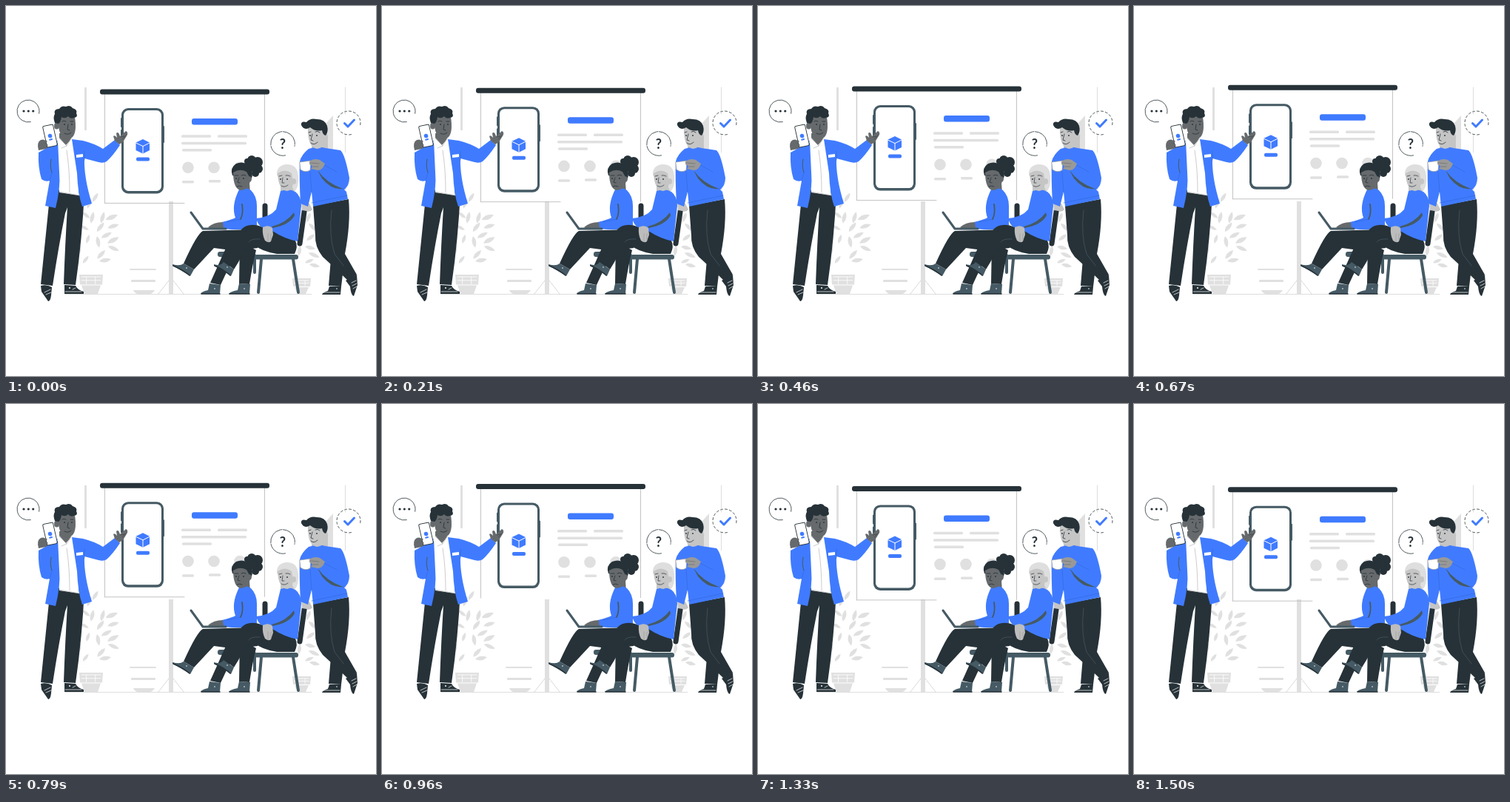
Write an HTML page with a canvas that moves like this. It is 500 px wide and 500 px high and loops after 1540 ms.

```html
<!DOCTYPE html>
<html lang="en">
<head>
<meta charset="utf-8">
<title>Presentation</title>
<style>
html, body { margin: 0; width: 100%; height: 100%; overflow: hidden; background: #fff; }
canvas { display: block; width: 500px; height: 500px; }
</style>
</head>
<body>
<canvas id="stage" width="500" height="500"></canvas>
<script>
const ctx = document.getElementById('stage').getContext('2d');
const LOOP = 1540, PEAK = 725, LIFT = 6.2;
const BLUE = '#407bff', DARK = '#263238', SLATE = '#455a64', PALE = '#e0e0e0',
  SKIN = '#666a6c', LIGHT = '#c5c5c5', WHITE = '#fff';

function fill(color, path) {
  ctx.fillStyle = color;
  ctx.fill(new Path2D(path));
}
function line(color, width, path) {
  ctx.strokeStyle = color;
  ctx.lineWidth = width;
  ctx.lineCap = ctx.lineJoin = 'round';
  ctx.stroke(new Path2D(path));
}
function oval(color, x, y, rx, ry = rx, turn = 0) {
  ctx.fillStyle = color;
  ctx.beginPath();
  ctx.ellipse(x, y, rx, ry, turn, 0, 7);
  ctx.fill();
}
function bar(color, x, y, w, h, r = 1) {
  ctx.fillStyle = color;
  ctx.beginPath();
  ctx.roundRect(x, y, w, h, r);
  ctx.fill();
}
function leaf(x, y, size, degrees) {
  ctx.save();
  ctx.translate(x, y);
  ctx.rotate(degrees * Math.PI / 180);
  ctx.scale(size, size);
  fill(PALE, 'M-8 0Q-2-6 8-1Q1 5-8 0Z');
  ctx.restore();
}
function pot(x, y, w, h) {
  const rim = h * .52;
  fill(PALE, `M${x} ${y}h${w}l-1 ${rim}h${2 - w}ZM${x + 3} ${y + rim + 1}h${w - 6}l-4 ${h - rim - 1}h${14 - w}Z`);
  line(WHITE, .8, `M${x + 3} ${y + 3}h${w - 6}M${x + 3} ${y + rim / 2 + 1}h${w - 6}M${x + w * .3} ${y + 3}v${rim - 4}M${x + w * .68} ${y + 3}v${rim - 4}`);
}
function bubble(x, y, r, dash) {
  ctx.save();
  ctx.setLineDash(dash);
  ctx.strokeStyle = DARK;
  ctx.lineWidth = .8;
  ctx.beginPath();
  ctx.arc(x, y, r, 1.35, 6.5);
  ctx.stroke();
  ctx.restore();
}

function drawRoom() {
  bar(PALE, 106, 110, 3, 58, 0);
  line('#d5d5d5', .8, 'M458.5 110V146M458.5 174V198M80 389.5H413');
  fill(PALE, 'M442 148V195L431 191V160Z');
  bar(PALE, 220, 264, 6, 125, 0);
  line('#d0d0d0', .8, 'M220 371L206 389M226 371L240 389');
  bar(PALE, 167, 355, 36, 2);
  bar(PALE, 169, 370, 33, 3);
  fill(PALE, 'M172 384H201Q198 389 194 389H179Q174 389 172 384Z');
  pot(99, 363, 32, 26);
  pot(387, 368, 25, 21);
  [[113, 267, .9, -65], [121, 259, .9, -55], [108, 283, .8, 40], [117, 286, 1, -75],
   [106, 300, .8, 30], [111, 315, .8, -70], [99, 331, .9, -70], [108, 343, .8, -50],
   [131, 286, 1, -72], [143, 286, 1.1, -20], [128, 299, 1, -50], [145, 298, 1, -15],
   [136, 310, 1, -25], [124, 319, 1, 82], [145, 317, 1.1, -25], [129, 336, 1, -45],
   [145, 328, 1, 25], [134, 344, 1, -8]].forEach(p => leaf(...p));
  [[409, 286, .9, -65], [414, 299, .9, 45], [412, 313, .9, -35], [397, 331, .9, -80],
   [411, 327, .9, 15], [416, 337, 1, 25], [410, 345, .8, -20], [417, 351, .9, 15]].forEach(p => leaf(...p));
}

function drawBoard(time) {
  line('#bdbdbd', .9, 'M133.5 119V266.5M349.5 119V266');
  if (time < 800 || time > 1300) line('#bdbdbd', .9, 'M133.5 266.5H241');
  bar(DARK, 127, 112.5, 229, 7, 3);

  line(SLATE, 2, 'M156 152V163M156 168V179M213 163V184');
  bar(SLATE, 156, 138, 57, 115.5, 9);
  bar(WHITE, 159, 141, 51, 109, 6.5);
  fill(BLUE, 'M185 180L194 184.5V195L185 199.5L175.5 195V184.5Z');
  line(WHITE, 1, 'M175.5 185L185 189.5L194 185M185 189.5V199');
  bar(BLUE, 176, 204.5, 18, 5, 2);

  bar(BLUE, 251, 152, 62, 8.5, 3);
  [[237, 174.3, 40], [286, 174.3, 40], [237, 183.8, 88], [238, 193, 40],
   [238, 236, 16], [274, 235, 16]].forEach(([x, y, w]) => bar(PALE, x, y, w, 3.5, 1.5));
  [246, 281, 316].forEach(x => oval(PALE, x, 218.2, 7.8));
}

function drawBubbles() {
  bubble(30, 142, 15, []);
  [24, 30.3, 36.7].forEach(x => oval(DARK, x, 142, 1.6));
  bubble(374, 186, 16.3, [26, 1.5]);
  ctx.fillStyle = DARK;
  ctx.font = 'bold 18px Lato, sans-serif';
  ctx.textAlign = 'center';
  ctx.fillText('?', 374, 193);
  bubble(463, 158, 16, [3, 3]);
  line(BLUE, 3, 'M457.5 158.5L462 163L470.5 154');
}

function drawPresenter() {
  fill(DARK, 'M58 268L47 376L63 378Q71 325 80 280L83 272Q80 320 78 376L94 377Q103 315 106 250L72 248Z');
  fill(DARK, 'M47 378Q55 376 62 380L61 391Q60 399 57 399L48 386Z');
  fill(DARK, 'M79 377L94 378Q97 384 105 386V389H79Z');
  line(WHITE, .7, 'M52 387L60 383M54 390L61 387M80 386H102M90 383L94 381');
  oval(WHITE, 86, 381, 1);

  fill(WHITE, 'M70 184L90 181L99 256L72 252Z');
  line('#aaa', .6, 'M82 195Q86 220 86 252M72 251L99 256');
  fill(SKIN, 'M72 172H89L88 180L81 188L72 181Z');
  fill(BLUE, 'M70 182Q58 186 53 193L44 198Q43 218 48 234Q53 238 59 236L53 270L67 273Q74 245 72 225Z');
  fill(BLUE, 'M89 180L104 182Q120 186 131 193L147 181L154 188Q144 203 136 210Q132 213 125 211L106 206Q105 231 116 267L103 271Q97 254 96 226Z');
  line(SLATE, 1, 'M61 207Q59 217 62 225');
  line('#3165d8', .6, 'M106 196V208M59 236L62 226');
  fill(WHITE, 'M95 201L104 200V204L95 205Z');
  fill(WHITE, 'M72 178L82 189L75 192L69 184ZM89 177L82 189L88 190Z');
  line('#999', .5, 'M72 179L82 189L75 192M89 178L82 189');

  oval(SKIN, 68.5, 162, 3.5, 4.5);
  fill(SKIN, 'M71 149Q82 144 93 150Q96 170 90 177Q82 183 74 174Q70 166 71 149Z');
  fill(DARK, 'M66 158Q63 150 66 146Q64 139 72 139Q75 134 81 136Q87 133 90 138Q97 140 95 145Q98 150 92 151Q87 153 84 149Q80 153 75 150Q74 157 71 159Z');
  line(DARK, .8, 'M76 156Q78 154 81 156M87 156L91 156M84 160L83 167L86 168M79 172Q84 175 88 171');
  oval(DARK, 79, 160, .9);
  oval(DARK, 89, 160, .9);

  fill(SKIN, 'M44 195Q41 184 47 181Q52 179 55 184L59 189L54 193Z');
  ctx.save();
  ctx.translate(59.5, 175.5);
  ctx.rotate(-.22);
  bar(DARK, -7.5, -15, 15, 30, 2);
  bar(WHITE, -6.6, -14.1, 13.2, 28.2, 1.5);
  oval(BLUE, 0, 0, 2.8);
  bar(BLUE, -2.5, 4, 5, 2);
  ctx.restore();
  line(SKIN, 3, 'M46 185L54 183M46 189L55 188');
  fill(SKIN, 'M147 182L145 176Q147 174 150 178L149 172Q152 169 154 176L162 169Q165 170 164 174L158 184L153 187Z');
  line(DARK, .5, 'M155 177L160 176M157 180L162 175');
}

function drawWoman() {
  line(DARK, 7, 'M350 270V304');
  line(SLATE, 4, 'M294 338L288 365M336 337V360');
  bar(SLATE, 286, 332, 48, 7, 3);
  fill(DARK, 'M302 316L276 374L290 377Q302 350 315 330L340 327V303Z');
  fill(DARK, 'M266 304Q258 308 240 348L254 356L281 327L334 334V302Z');
  fill(SLATE, 'M240 348L254 356L249 365Q235 356 225 351V349Q235 352 240 348Z');
  fill(SLATE, 'M275 375L290 377L289 389H263Q264 386 273 384Z');
  line(DARK, 1.5, 'M226 351Q238 356 248 364M264 389H289');
  oval(WHITE, 244, 354, .8);
  oval(WHITE, 282, 382, .8);

  fill(SKIN, 'M315 238L329 239L330 253H315Z');
  fill(BLUE, 'M315 248Q325 244 331 249Q339 257 339 270V302H305L292 301V292Q307 288 310 286Q304 270 315 248Z');
  line(SLATE, 1.8, 'M319 268Q321 280 317 288');
  line('#3165d8', .6, 'M317 288L299 292');
  fill(SKIN, 'M293 292Q281 292 273 299L276 301H294Z');
  line(SLATE, 3, 'M250 279L266 301H297');

  [[340, 211, 7], [332, 208, 6], [341, 220, 6], [331, 216, 8], [337, 226, 5], [326, 210, 4]]
    .forEach(([x, y, r]) => oval(DARK, x, y, r));
  fill(DARK, 'M306 229Q302 219 311 213Q323 208 331 219Q336 230 328 240L316 232Z');
  fill(SKIN, 'M307 225Q316 219 325 224L330 233Q330 247 318 249Q307 248 307 225Z');
  oval(SKIN, 329, 234, 2.8, 3.8);
  line(DARK, .8, 'M309 229L314 229M318 229Q321 227 324 229M315 232L313 238L316 239M312 244Q316 242 319 244');
  oval(DARK, 311, 233, .9);
  oval(DARK, 321, 233, .9);
}

function drawElder() {
  line(DARK, 7, 'M404 271L397 321');
  line(SLATE, 4, 'M345 342L341 387M388 342L395 387');
  bar(SLATE, 336, 336, 59, 6.5, 3);
  fill(DARK, 'M316 318L315 375L329 376Q333 350 338 330Z');
  fill(DARK, 'M348 299Q328 291 318 302L294 345L308 356Q320 337 328 319Q346 332 366 335H390Q395 325 391 317L360 300Z');
  line('#536169', .6, 'M328 319Q331 314 343 315');
  fill(SLATE, 'M294 346L308 356L304 365Q293 356 281 351V349Q290 352 294 346Z');
  fill(SLATE, 'M315 375L330 376L329 389H301Q303 386 313 384Z');
  line(DARK, 1.5, 'M282 351Q294 356 303 364M302 389H329');
  oval(WHITE, 299, 353, .8);
  oval(WHITE, 322, 382, .8);

  fill(LIGHT, 'M371 240H390V258H371Z');
  fill(BLUE, 'M371 250Q383 246 391 251Q399 257 399 270L394 318Q377 315 360 304L346 299Q341 297 338 287Q357 285 365 275Z');
  fill(SLATE, 'M359 298Q379 293 389 279L390 283Q383 296 360 300Z');
  fill('#bdbdbd', 'M347 299Q355 295 360 300L361 309L358 318Q355 321 350 317Q346 309 347 299Z');
  line('#888', .5, 'M354 308V318M358 308V316');

  fill('#dedede', 'M366 229Q365 216 378 214Q394 213 395 230Q396 245 390 251L384 239Z');
  fill(LIGHT, 'M367 226Q377 219 386 226L388 238Q388 248 380 250Q368 249 367 226Z');
  oval(LIGHT, 389, 237, 3, 4);
  line(DARK, .7, 'M369 230L373 229M378 229Q381 228 384 230M374 232L373 239L376 239M372 243Q376 246 381 242');
  oval(DARK, 371, 234, .9);
  oval(DARK, 380, 234, .9);
}

function drawStanding() {
  fill(DARK, 'M440 330L436 378L453 379L458 338Z');
  fill(DARK, 'M415 270L463 261Q466 293 458 335L474 363L462 371Q445 354 428 339Q417 325 418 310Z');
  line('#536169', .6, 'M440 276Q436 310 444 335L456 351');
  fill(DARK, 'M437 379H453L452 390H427Q428 387 435 385Z');
  fill(DARK, 'M459 371L474 363L475 377L470 392Q466 391 465 379Z');
  line(WHITE, .7, 'M429 387H451M467 374L473 371M468 378L474 375M469 382L474 379');
  oval(WHITE, 447, 382, .8);

  fill(LIGHT, 'M399 266L410 267L414 275Q411 279 406 277L400 276Z');
  fill(LIGHT, 'M413 178H435V198H413Z');
  fill(BLUE, 'M409 193Q421 189 432 192L452 195Q458 200 464 232Q464 243 457 248L460 251L462 261L415 271L413 251L408 271L398 267Q396 232 397 210Q399 201 409 193Z');
  fill(SLATE, 'M421 222Q433 239 455 247Q440 249 427 233Z');
  line('#3165d8', .6, 'M413 251L411 224M455 247L459 247M447 224L430 215M413 266L461 256');

  fill(WHITE, 'M397 211L412 209L411 222Q404 226 398 221Z');
  line('#999', .7, 'M397 211L412 209L411 222Q404 226 398 221Z');
  fill('#999', 'M410 210Q416 205 424 208L431 213Q428 222 421 222L412 220Q417 216 410 214Z');
  line('#666', .6, 'M412 212L423 213M415 217L422 217');

  fill(LIGHT, 'M408 163Q424 157 433 168L434 181Q432 191 420 193Q407 191 408 163Z');
  oval(LIGHT, 432, 177, 3.2, 4.5);
  fill(DARK, 'M399 161Q398 155 406 157Q411 151 420 153Q431 153 434 162Q436 170 432 175Q428 174 427 168Q418 170 411 164Q403 169 399 161Z');
  line(DARK, .8, 'M409 171L412 170M418 170Q421 168 424 171M414 173L412 181L415 182M412 185Q416 189 421 184');
  oval(DARK, 411, 175, .9);
  oval(DARK, 420, 175, .9);
}

function render(now) {
  const time = now % LOOP;
  const rise = time < PEAK ? time / PEAK : (LOOP - time) / (LOOP - PEAK);
  ctx.fillStyle = WHITE;
  ctx.fillRect(0, 0, 500, 500);
  drawRoom();
  ctx.save();
  ctx.translate(0, -LIFT * rise);
  drawBoard(time);
  ctx.restore();
  drawBubbles();
  drawPresenter();
  drawWoman();
  drawElder();
  drawStanding();
}

const start = performance.now();
function tick() {
  render(performance.now() - start);
  requestAnimationFrame(tick);
}
tick();
</script>
</body>
</html>
```
